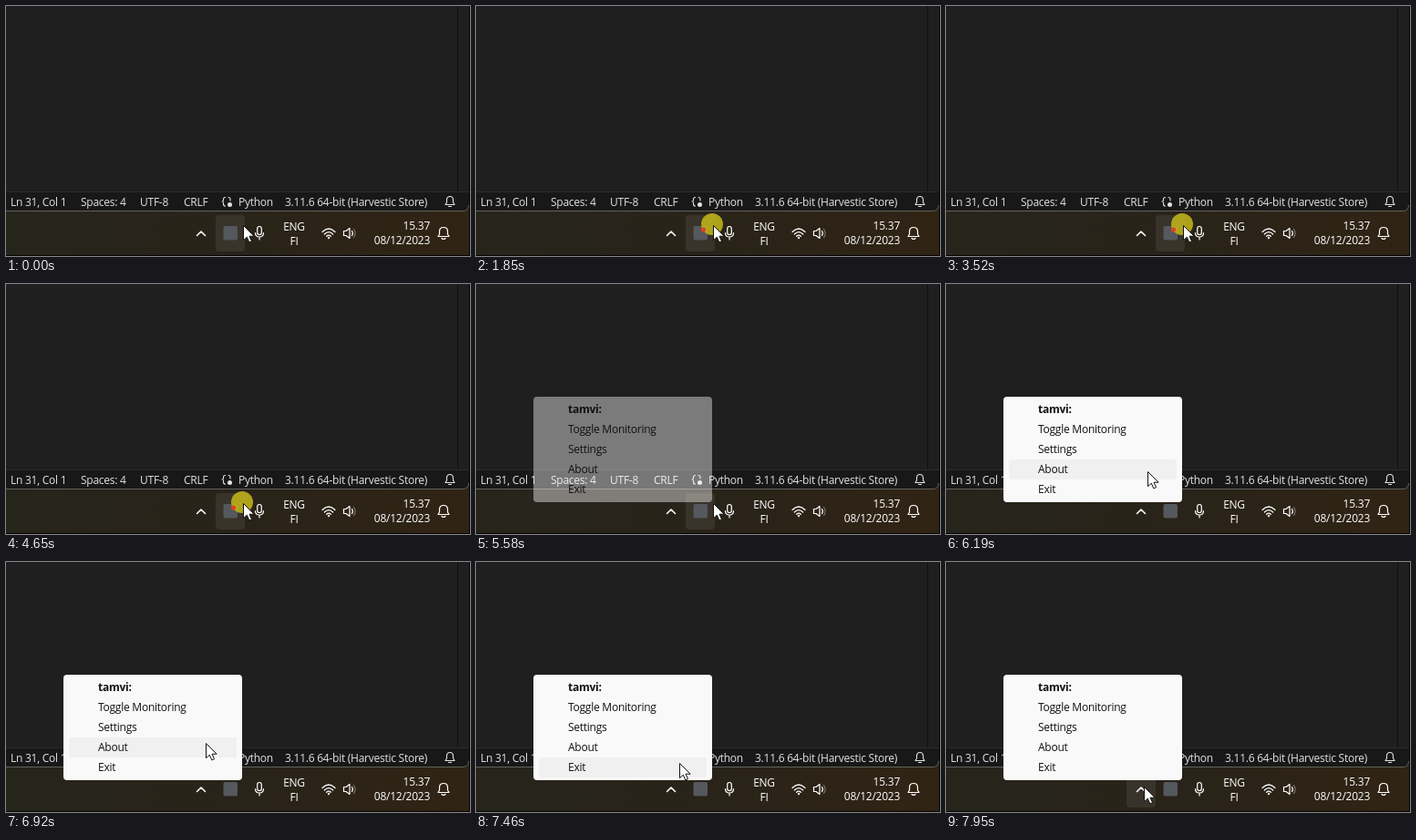
An HTML page that plays this animation: 509x275 px, repeating every 8 s.

```html
<!DOCTYPE html>
<html>
<head>
<meta charset="utf-8">
<style>
  html, body { margin: 0; width: 100%; height: 100%; overflow: hidden; background: #1f1f1f; }
  svg { display: block; width: 509px; height: 275px; font: 12px "Open Sans", "Noto Sans", sans-serif; letter-spacing: -.25px; }
  .line { fill: none; stroke-linecap: round; stroke-linejoin: round; }
</style>
</head>
<body>
<svg viewBox="0 0 509 275">
  <defs>
    <linearGradient id="bar">
      <stop stop-color="#26251c"/><stop offset=".5" stop-color="#292319"/><stop offset="1" stop-color="#302414"/>
    </linearGradient>
  </defs>

  <!-- Taskbar and editor window -->
  <rect y="220" width="509" height="55" fill="url(#bar)"/>
  <path d="M0 0H508V219Q508 226 501 226H0Z" fill="#1f1f1f"/>
  <path d="M0 204H508V219Q508 226 501 226H0Z" fill="#181818"/>
  <path d="M0 204.5H508" stroke="#2b2b2b"/>
  <path d="M495.5 0V204" stroke="#101010"/>
  <path d="M507.5 219Q507.5 225.5 501 225.5H0" fill="none" stroke="#63615c"/>
  <path d="M508.5 0V274.5H0" fill="none" stroke="#050505"/>

  <!-- Status bar -->
  <g fill="#e2e2e2">
    <text x="5" y="220">Ln 31, Col 1</text>
    <text x="82" y="220">Spaces: 4</text>
    <text x="147" y="220">UTF-8</text>
    <text x="195" y="220">CRLF</text>
    <text x="255" y="220">Python</text>
    <text x="306" y="220">3.11.6 64-bit (Harvestic Store)</text>
    <circle cx="245.5" cy="218.5" r="2.5"/>
  </g>
  <g class="line" stroke="#e2e2e2" stroke-width="1.1">
    <path d="M240.5 210.5Q238.5 210.5 238.5 212.5V213.5Q238.5 215 237 215Q238.5 215 238.5 216.5V218Q238.5 220 240.5 220M244 210.5Q246 210.5 246 212.5V214"/>
    <path d="M482 218.5H492L490.5 216V213.5Q490.5 209.5 487 209.5Q483.5 209.5 483.5 213.5V216ZM485.5 220.5H488.5"/>
  </g>

  <!-- Tray -->
  <rect id="hover" y="230" width="32" height="40" rx="4" fill="#fff" fill-opacity=".075"/>
  <rect x="238.5" y="242" width="15.5" height="15.5" rx="2" fill="#55585c"/>
  <g class="line" stroke="#fff" stroke-width="1.2">
    <path d="M209.5 252.5L214 248L218.5 252.5" stroke-width="1.5"/>
    <rect x="275.7" y="242.5" width="4.6" height="9" rx="2.3"/>
    <path d="M273.5 249.5Q273.5 254 278 254Q282.5 254 282.5 249.5M278 254V257"/>
    <path d="M347 248.5Q354 241.5 361 248.5M349.3 251Q354 246.2 358.7 251M351.6 253.3Q354 251 356.4 253.3"/>
    <path d="M370.5 247.5H373L377 244.5V255.5L373 252.5H370.5Z"/>
    <path d="M379.5 247.5Q381.2 250 379.5 252.5"/>
    <path d="M381.5 245.5Q384.6 250 381.5 254.5" stroke="#77736b"/>
    <path d="M474 253.5H486L484.5 251V248Q484.5 243.5 480 243.5Q475.5 243.5 475.5 248V251ZM478 255.5Q480 257.5 482 255.5"/>
  </g>
  <circle cx="354" cy="255" r="1.2" fill="#fff"/>
  <g fill="#fff">
    <text x="316" y="247" text-anchor="middle">ENG</text>
    <text x="316" y="263" text-anchor="middle">FI</text>
    <text x="465" y="246" text-anchor="end">15.37</text>
    <text x="465" y="262" text-anchor="end">08/12/2023</text>
  </g>

  <!-- Context menu -->
  <g id="menu">
    <rect id="panel" x="63" y="124" width="196" height="116" rx="4" fill="#f9f9f9"/>
    <rect id="row" x="69" width="184" height="22" rx="3" fill="#f0f0f0"/>
    <g fill="#111">
      <text x="101" y="142" font-weight="bold">tamvi:</text>
      <text x="101" y="164">Toggle Monitoring</text>
      <text x="101" y="186">Settings</text>
      <text x="101" y="208">About</text>
      <text x="101" y="230">Exit</text>
    </g>
  </g>

  <g id="click">
    <circle cx="259" cy="240" r="12" fill="#c4b91a" fill-opacity=".85"/>
    <circle cx="249.5" cy="246" r="2.6" fill="#e0441c"/>
  </g>
  <path id="cursor" d="M.5 .5V16.7L4.3 13.2L6.8 18.9L9.5 17.7L7 12.2H12.1Z" fill="#fff" stroke="#111"/>
</svg>
<script>
const LOOP = 8000, MENU_OPEN = 5580;
const clicks = [[460, 660], [1850, 2390], [3520, 3720], [4650, 4850], [5380, 5580]];
// Cursor tip: time, x, y
const path = [
  [0, 260, 241], [5780, 260, 241], [6190, 221, 206], [6380, 211, 188], [6449, 211, 188],
  [6450, 211, 185], [6919, 211, 185], [6920, 219, 199], [7250, 231, 214], [7600, 218, 225],
  [7739, 218, 225], [7950, 217, 247], [LOOP, 217, 247]
];
const el = id => document.getElementById(id);
const show = (id, on) => el(id).setAttribute("visibility", on ? "visible" : "hidden");

function cursorAt(t) {
  const i = path.findIndex(p => p[0] > t);
  const [t0, x0, y0] = path[i - 1], [t1, x1, y1] = path[i];
  const k = (t - t0) / (t1 - t0);
  return [Math.round(x0 + (x1 - x0) * k), Math.round(y0 + (y1 - y0) * k)];
}

function draw(now) {
  const t = now % LOOP, open = t >= MENU_OPEN;
  const [x, y] = cursorAt(t);
  const inMenu = open && x < 259 && y > 149 && y < 237;
  const onChevron = x < 230 && y > 236, onIcon = x > 238 && y > 236;

  el("cursor").setAttribute("transform", `translate(${x} ${y})`);
  show("click", clicks.some(([from, to]) => t >= from && t < to));
  show("menu", open);
  el("panel").setAttribute("opacity", Math.min(1, 0.42 + Math.max(0, t - MENU_OPEN - 60) / 150));
  show("row", inMenu);
  el("row").setAttribute("y", 149 + 22 * Math.floor((y - 149) / 22));
  show("hover", onIcon || onChevron);
  el("hover").setAttribute("x", onChevron ? 198 : 230);
  requestAnimationFrame(draw);
}
requestAnimationFrame(draw);
</script>
</body>
</html>
```
